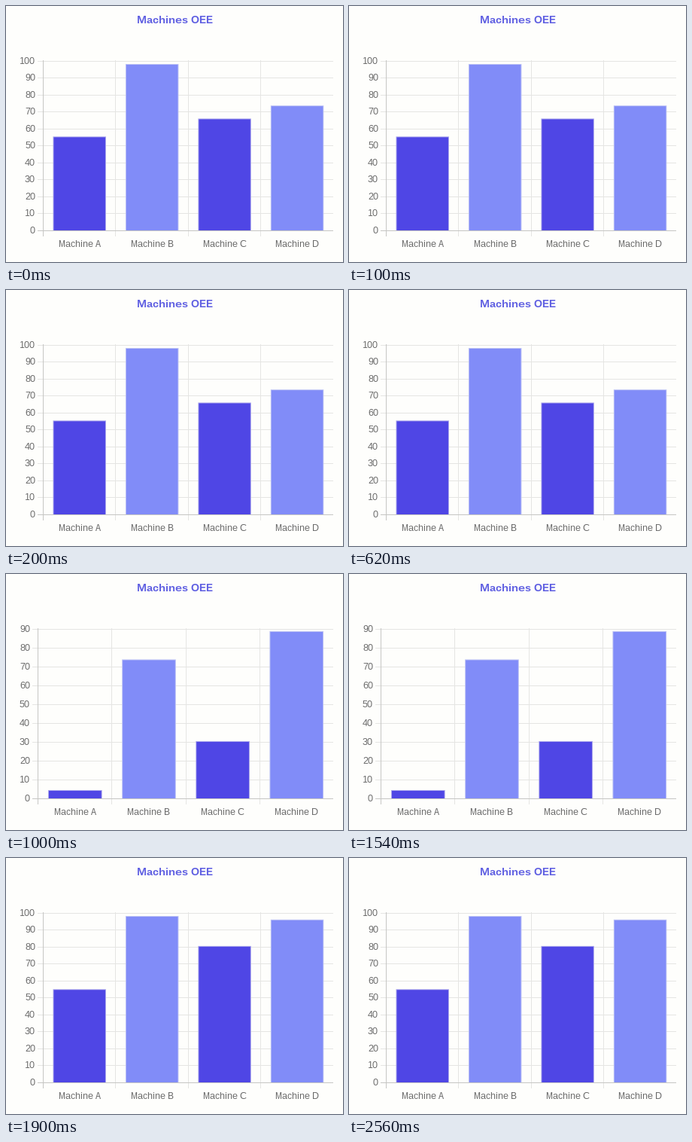
Animation, 448 px wide and 340 px high, one loop 3000 ms. Source, as a matplotlib script:

```python
import math

import matplotlib.pyplot as plt
from matplotlib.animation import FuncAnimation
from matplotlib.patches import Rectangle

W, H, DPI = 448, 340, 100
TOP, BOTTOM, RIGHT = 73, 298, 435.3
STEP_MS, LOOP_MS = 100, 3000

PAPER = "#fefefc"
GRID = "#e5e5e3"
AXIS = "#c6c6c4"
INK = "#666666"
TITLE = "#5f5fe2"
DARK, LIGHT = "#4f46e5", "#818cf8"
EDGES = {DARK: "#a9a5ec", LIGHT: "#b9bff5"}

# start time in ms, left edge of the plot, axis maximum, bar values
SCENES = [
    (0, 49.5, 100, (55.4, 98.2, 66.0, 73.7)),
    (900, 42.8, 90, (4.4, 73.8, 30.4, 88.8)),
    (1900, 49.5, 100, (55.0, 98.2, 80.5, 96.1)),
]

plt.rcParams["font.family"] = "Liberation Sans"
plt.rcParams["text.hinting"] = "default"
plt.rcParams["text.hinting_factor"] = 1

fig = plt.figure(figsize=(W / DPI, H / DPI), dpi=DPI, facecolor=PAPER)
ax = fig.add_axes([0, 0, 1, 1])
ax.set_xlim(0, W)
ax.set_ylim(H, 0)
ax.axis("off")


def box(x, y, w, h, color, **kw):
    return ax.add_patch(Rectangle((x, y), w, h, fc=color, lw=0, **kw))


def label(x, y, text, size, color=INK, ha="center", weight="normal"):
    return ax.text(x, y, text, fontsize=size * 72 / DPI, color=color,
                   ha=ha, va="baseline", weight=weight)


def bar(x, y, w, color):
    """A filled bar with a thin pale outline on its sides and top."""
    return [
        box(x - 0.5, y - 0.5, w + 1, BOTTOM - y + 0.5, EDGES[color],
            zorder=3, snap=False),
        box(x + 0.5, y + 0.5, w - 1, BOTTOM - y - 0.5, color,
            zorder=4, snap=False),
    ]


def build(left, peak, values):
    parts = []
    ticks = peak // 10
    x0 = math.floor(left)
    for i in range(ticks + 1):
        y = math.floor(BOTTOM - (BOTTOM - TOP) * i / ticks)
        parts.append(box(x0 - 7, y, 435 - x0 + 7, 1, GRID if i else AXIS,
                         zorder=1 if i else 5))
        parts.append(label(x0 - 10, y + 4, str(10 * i), 12, ha="right"))

    slot = (RIGHT - left) / len(values)
    width = slot * 0.72
    for i, value in enumerate(values):
        x = left + slot * i
        mid = x + slot / 2
        parts.append(box(math.floor(x), TOP - 1, 1, BOTTOM - TOP + 9,
                         GRID if i else AXIS, zorder=1 if i else 2))
        y = BOTTOM + 0.5 - (BOTTOM - TOP) * value / peak
        parts += bar(mid - width / 2, y, width, LIGHT if i % 2 else DARK)
        parts.append(label(mid, 320, "Machine " + "ABCD"[i], 12))
    return parts


label(225, 23, "Machines OEE", 14, TITLE, weight="bold")
groups = [build(*scene[1:]) for scene in SCENES]


def update(n):
    now = n * STEP_MS
    current = max(k for k, scene in enumerate(SCENES) if now >= scene[0])
    for k, group in enumerate(groups):
        for part in group:
            part.set_visible(k == current)
    return []


anim = FuncAnimation(fig, update, frames=LOOP_MS // STEP_MS,
                     interval=STEP_MS, repeat=True, repeat_delay=0)
plt.show()
```
